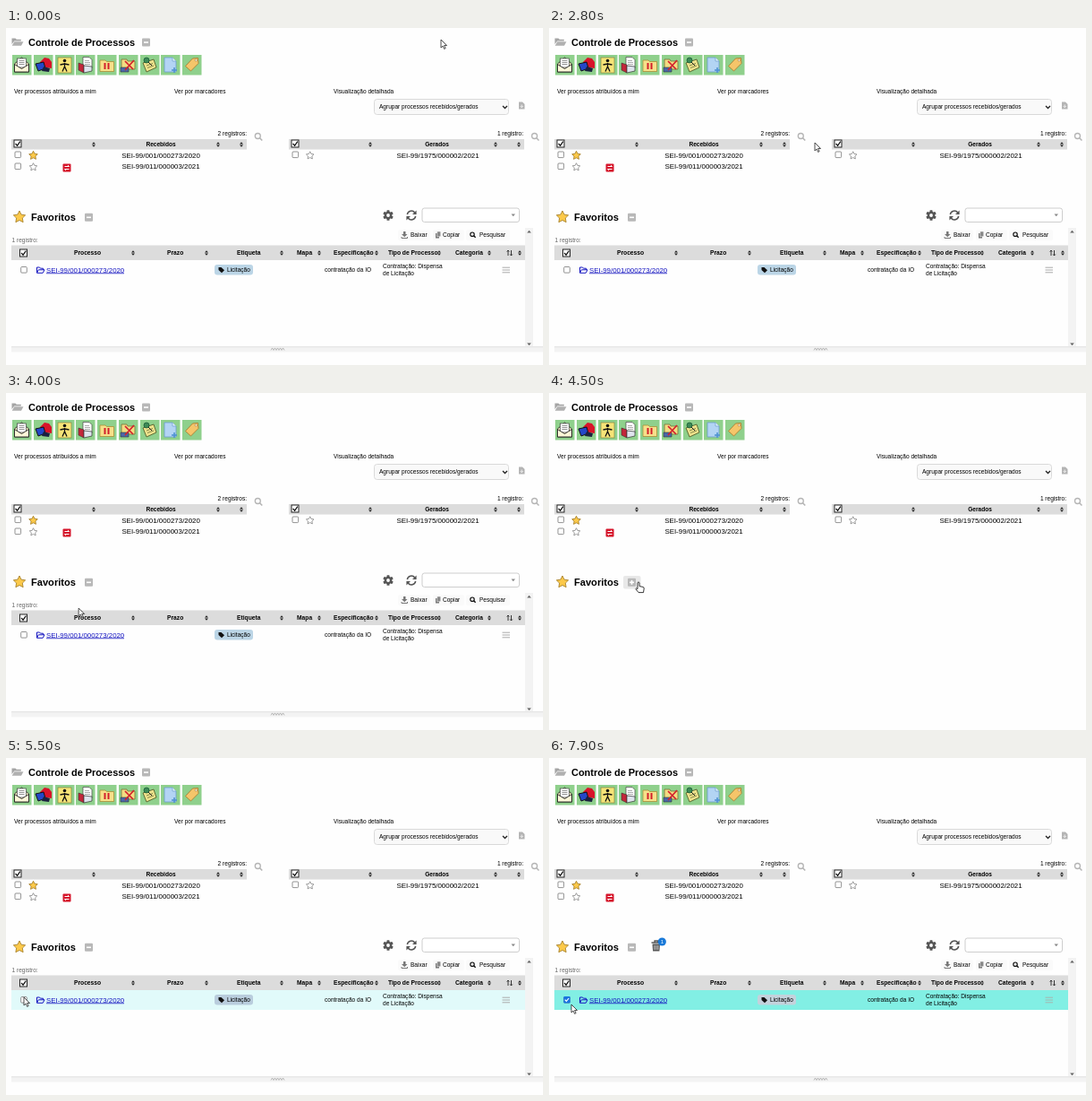
Recreate the animation shown at these times as an HTML page. Size 600x376 px, loop 8 s.

```html
<!DOCTYPE html>
<html lang="pt-BR">
<head>
<meta charset="utf-8">
<title>Controle de Processos</title>
<style>
html, body { margin: 0; width: 100%; height: 100%; overflow: hidden; background: #fefefe; }
svg { display: block; font: 6.55px "Liberation Sans", Arial, sans-serif; }
.b { font-weight: bold; }
</style>
</head>
<body>
<svg id="stage" width="600" height="376" viewBox="0 0 600 376"></svg>
<script>
const rect = (x, y, w, h, fill, more = '') =>
  `<rect x="${x}" y="${y}" width="${w}" height="${h}" fill="${fill}" ${more}/>`;
const path = (d, fill, stroke = 'none', width = 1, more = '') =>
  `<path d="${d}" fill="${fill}" stroke="${stroke}" stroke-width="${width}" ${more}/>`;
const line = (d, stroke, width = 1) => path(d, 'none', stroke, width);
const circle = (x, y, r, fill, more = '') => `<circle cx="${x}" cy="${y}" r="${r}" fill="${fill}" ${more}/>`;
const text = (x, y, s, more = '') => `<text x="${x}" y="${y}" ${more}>${s}</text>`;
const bold = (x, y, s, more = '') => text(x, y, s, 'class="b" ' + more);
const at = (x, y, s) => `<g transform="translate(${x} ${y})">${s}</g>`;
const group = (id, s) => `<g id="${id}">${s}</g>`;
const MIDDLE = 'text-anchor="middle"', END = 'text-anchor="end"';

function star(x, y, r, fill, stroke, width) {
  let d = '';
  for (let i = 0; i < 10; i++) {
    const a = (i / 5 - .5) * Math.PI, q = i % 2 ? r * .5 : r;
    d += (i ? 'L' : 'M') + (x + q * Math.cos(a)).toFixed(2) + ' ' + (y + q * Math.sin(a)).toFixed(2);
  }
  return path(d + 'Z', fill, stroke, width, 'stroke-linejoin="round"');
}
const goldStar = (x, y, r) => star(x, y, r, '#fcc94a', '#a8802a', .9);
const sort = (x, y) => path(`M${x - 2} ${y - .5}l2 -2.3 2 2.3zM${x - 2} ${y + .5}l2 2.3 2 -2.3z`, '#222');
const box = (x, y) => rect(x, y, 6.6, 6.6, '#fff', 'rx="1" stroke="#777" stroke-width=".8"');
const checkAll = (x, y) => rect(x, y, 8, 8, '#fff', 'stroke="#222"') +
  line(`M${x + 1.6} ${y + 4}l2 2.2 3.2 -4.6`, '#111', 1.2);
const toggle = (x, y) => rect(x, y, 9, 9, '#b8b8b8', 'rx="1"') + rect(x + 2, y + 3.7, 5, 1.6, '#fff');
const lens = (x, y, c, r = 3, w = 1.3) => circle(x, y, r, 'none', `stroke="${c}" stroke-width="${w}"`) +
  line(`M${x + r * .75} ${y + r * .75}l${r * .9} ${r * .9}`, c, w * 1.2);

// Toolbar pictures, each on a 21 x 22 tile
const pictures = [
  path('M2.5 10l8 -7 8 7v9h-16z', '#f3ecc0', '#222', .9) + rect(5.5, 4, 10, 10, '#fff', 'stroke="#444" stroke-width=".7"') +
    line('M7.5 6.5h6M7.5 8.5h6M7.5 10.5h6', '#666', .7) + path('M2.5 10.5l8 5 8 -5v8.5h-16z', '#fff8d8', '#222', .9),
  path('M7 8l5 -5 5 1 3 4v7l-6 -1 -6 -2z', '#d8142a') + path('M2 10l9 -2 2 7 -8 3z', '#2447c8', '#111', 1) +
    path('M11 13l7 2 -1 4 -8 -1z', '#1b2140'),
  rect(3, 3, 15, 17, '#f6e478', 'stroke="#8a8440" stroke-width=".7"') + circle(10.5, 6.5, 1.8, '#111') +
    line('M5.5 11l5 -1 5 1M10.500 9v5M10.500 13l-2.500 5.500M10.500 13l2.500 5.500', '#111', 1.3),
  path('M8 2.5h7l3 3v9h-10z', '#fff', '#444', .7) + line('M10 6.5h5M10 8.500h6M10 10.500h6', '#888', .7) +
    path('M3 9l6 2v9l-6 -3z', '#c3263a', '#333', .6) + path('M9 12l9 1v5l-9 2z', '#dfe4ee', '#333', .7),
  path('M3 6h6l1.500 1.500h8v11h-15.500z', '#f6e08a', '#a8842c', .7) + rect(7.5, 9, 2, 7, '#d21f2b') + rect(11.5, 9, 2, 7, '#d21f2b'),
  path('M3 5h6l1 2h8v9h-15z', '#f3dc82', '#6f612b', .7) + path('M2 14h9v5h-9z', '#4a68a8', '#333', .6) +
    line('M7 7l9 9M17 6l-10 11', '#d3202c', 1.7),
  path('M3 9l12 -4 3 9 -11 5z', '#eee28c', '#55602c', .9) + line('M7 12l7 -2.500M8 14.500l7 -2.500', '#6b7038', .8) +
    circle(7, 6, 3, '#3f8a56', 'stroke="#153" stroke-width=".7"') + line('M9 8l4 4', '#222', 1),
  path('M4 3h9l4 4v12h-13z', '#b3d4f4', '#6a9ccc', .8) + path('M13 3v4h4', '#e3f1fc', '#6a9ccc', .7) +
    line('M15 14v6M12 17h6', '#4b8fd0', 1.5),
  path('M3.500 12.500l8 -8.500 6 -.500 .500 6 -8.500 8.500z', '#f5c56a', '#a8742a', .8, 'stroke-linejoin="round"') +
    circle(15.3, 6, 1.2, '#fff', 'stroke="#a8742a" stroke-width=".6"')
];
const toolbar = pictures.map((p, i) =>
  at(7 + Math.round(i * 23.75), 30, rect(0, 0, 21.5, 22.5, '#8fd08c') + p)).join('');

const heading = path('M6.5 18v-6.5h4l1.3 1.3h5v1.7h-7.5z', '#a5a5a5') + path('M9.3 15.3h10.2l-2.5 4.5h-10.3z', '#b0b0b0') +
  bold(25, 19.7, 'Controle de Processos', 'font-size="10.95"') + toggle(152, 11.5) + toolbar +
  text(9, 73.3, 'Ver processos atribuídos a mim') + text(188, 73.3, 'Ver por marcadores') +
  text(366, 73.3, 'Visualização detalhada') +
  rect(411.5, 79.5, 150, 17, '#f9f9f9', 'rx="3" stroke="#d6d6d6" stroke-width=".9"') +
  text(417, 90.3, 'Agrupar processos recebidos/gerados') + line('M555 87l2.5 2.5 2.5 -2.5', '#222', 1.3) +
  path('M573 82.5h4l2.5 2.5v5.5h-6.5z', '#b4b4b4') + line('M576.2 85.5v3M574.7 87.2l1.5 1.5 1.5 -1.5', '#fff', .8);

const number = (x, y, s) => text(x, y, s, MIDDLE + ' font-size="7.9"');
const inbox = text(269, 120, '2 registros:', END) + lens(281.3, 120.5, '#b4b4b4') +
  rect(6, 124, 263, 11.5, '#dcdcdc') + checkAll(9, 125) + bold(173, 132.3, 'Recebidos', MIDDLE) +
  [98, 237, 263].map(x => sort(x, 130)).join('') + box(10, 138) + box(10, 151) +
  goldStar(30.5, 142.3, 5) + star(30.5, 155.2, 4.5, '#fff', '#858585', .8) +
  rect(63.5, 151.5, 9, 9, '#d5152b', 'rx="1"') +
  line('M65.5 154.500h5l-1.500 -1.300M70.500 157.500h-5l1.500 1.300', '#fff', 1) +
  number(173, 144.5, 'SEI-99/001/000273/2020') + number(173, 157.2, 'SEI-99/011/000003/2021');

const created = text(578, 120, '1 registro:', END) + lens(590.5, 120.5, '#b4b4b4') +
  rect(316, 124, 263, 11.5, '#dcdcdc') + checkAll(319, 125) + bold(481.5, 132.3, 'Gerados', MIDDLE) +
  [407, 547, 573].map(x => sort(x, 130)).join('') + box(320, 138) +
  star(339.7, 142.3, 4.5, '#fff', '#858585', .8) + number(482.5, 144.5, 'SEI-99/1975/000002/2021');

const spokes = [0, 60, 120].map(a =>
  rect(-1.5, -5.8, 3, 11.6, '#555', `rx=".6" transform="rotate(${a})"`)).join('');
const gear = at(427, 209, spokes + circle(0, 0, 4.3, '#555') + circle(0, 0, 1.9, '#fefefe'));
const refresh = at(453, 209, line('M-4.7 -1a4.8 4.8 0 0 1 8.5 -2M4.7 1a4.8 4.8 0 0 1 -8.5 2', '#555', 1.5) +
  path('M5.6 -5.6v4.600h-4.600zM-5.600 5.600v-4.600h4.600z', '#555'));

const buttons = [[438, 36], [477, 35], [514, 49]].map(([x, w]) => rect(x, 225, w, 12, '#fafafa', 'rx="2"')).join('') +
  path('M444 227h2.5v3h2l-3.25 3.2 -3.25 -3.2h2z', '#777') + line('M442 233v1.5h6.5v-1.5', '#777', 1) +
  text(452, 233.3, 'Baixar') + rect(480, 229, 4, 5.5, '#777') + rect(481.8, 227, 4, 5.8, '#888', 'stroke="#fff" stroke-width=".5"') +
  text(488, 233.3, 'Copiar') + lens(521, 230.2, '#111', 2.2, 1.2) + text(529, 233.3, 'Pesquisar');

const columns = [['Processo', 76, 142], ['Prazo', 180, 224], ['Etiqueta', 258, 308], ['Mapa', 325, 350],
  ['Especificação', 366, 414], ['Tipo de Processo', 427, 484], ['Categoria', 502, 540]];
const head = rect(6, 242.5, 574, 16.5, '#dcdcdc') + checkAll(15.5, 247) +
  columns.map(([s, x, arrow]) => bold(x, 253.3, s, 'font-size="6.7"') + sort(arrow, 251)).join('') +
  line('M561 248v6M564.5 254v-6M559.7 249.5l1.3 -1.5 1.3 1.5M563.2 252.5l1.3 1.5 1.3 -1.5', '#222', .9) +
  sort(574, 251);

const row = `<rect id="rowFill" x="6" y="259" width="574" height="22"/>` + box(16.7, 266.5) +
  group('ticked', rect(16.3, 266, 7.4, 7.4, '#1874e0', 'rx="1.2"') + line('M17.8 269.7l1.6 1.7 2.8 -3.4', '#fff', 1.1)) +
  path('M34.5 273v-6h3l1 1.2h3v1.6M34.5 273.3l1.8 -3.5h6.7l-1.8 3.5z', 'none', '#1515c0', 1) +
  text(45, 272.5, 'SEI-99/001/000273/2020', 'font-size="7.85" fill="#1515c0"') + rect(45, 273.4, 87, .8, '#1515c0') +
  group('external', line('M139 267.5h-3v6h5.5v-3M138.5 270.5l3.5 -3.5M139.7 266.8h2.5v2.5', '#555', .9)) +
  `<rect id="pill" x="233" y="264" width="43" height="11.5" rx="3"/>` +
  path('M237.5 267h3l3.5 3.3 -3 3 -3.5 -3.3z', '#111') + text(247, 272.3, 'Licitação') +
  text(356, 272.3, 'contratação da IO') + text(421, 268.4, 'Contratação: Dispensa') + text(421, 276, 'de Licitação') +
  `<path id="menu" d="M554.5 267.2h8.5M554.5 270h8.5M554.5 272.8h8.5"/>`;

const panel = gear + refresh +
  rect(465, 201, 108.5, 15.5, '#fff', 'rx="2.5" stroke="#c8c8c8" stroke-width=".9"') + path('M564.5 207.5h4.5l-2.25 2.8z', '#888') +
  buttons + text(6.5, 239, '1 registro:', 'fill="#666"') + rect(580, 223, 9, 132.5, '#f3f3f3') +
  path('M582.2 228.5h4.6l-2.3 -2.8z', '#666') + path('M582.2 351.5h4.6l-2.3 2.8z', '#666') + head + row +
  rect(6, 355.5, 594, 6, '#f3f3f3') + line('M6 355.8h594', '#dcdcdc', .8) +
  line('M296 359.5' + 'l1.5 -2.5 1.5 2.5'.repeat(5), '#aaa', .8);

const trash = line('M114.5 206h10.5M118 205.5v-1.5h3.5v1.5', '#555', 1.3) +
  path('M115.5 207.5h8.5l-.6 8h-7.3z', '#555') + line('M117.8 209v5M119.8 209v5M121.8 209v5', '#fefefe', .7) +
  circle(126.3, 205, 4.6, '#1879d8') + text(126.3, 207.2, '1', MIDDLE + ' fill="#fff" font-size="6"');

const favourites = goldStar(15, 211, 7) + bold(28, 214.8, 'Favoritos', 'font-size="11.1"') +
  group('toggleHover', rect(83, 204, 19.5, 14.5, '#e8e8e8', 'rx="2"')) + toggle(88, 206.8) +
  group('plus', rect(91.7, 208.8, 1.6, 5, '#fff'));

document.getElementById('stage').innerHTML = heading + inbox + created + favourites + group('trash', trash) +
  group('panel', panel) +
  group('arrow', path('M0 0v9l2.1 -1.9 1.5 3.3 1.5 -.7 -1.5 -3.2h2.9z', '#fff', '#222', .8)) +
  group('hand', path('M-1 1q1 -1.5 2 0v4l4 .8q1.3 .4 1.2 1.7l-.7 4.5h-5.5l-3.2 -4q.6 -1.5 2.2 0z', '#fff', '#222', .9));

// Pointer stops: time, x, y
const stops = [[0, 486, 13], [2280, 486, 13], [2420, 465, 24], [2800, 297, 128], [3300, 110, 238], [3600, 66, 260],
  [3850, 67, 262], [4200, 100, 210.6], [5020, 100, 210.6], [5450, 20, 267], [5950, 20, 267], [6400, 25, 275],
  [7100, 25, 275], [7500, 29, 286], [7900, 25, 275], [8000, 25, 275]];

function pointer(t) {
  const i = stops.findIndex(s => s[0] > t);
  const [t0, x0, y0] = stops[i - 1], [t1, x1, y1] = stops[i];
  const k = (t - t0) / (t1 - t0);
  return [x0 + (x1 - x0) * k, y0 + (y1 - y0) * k];
}

const el = id => document.getElementById(id);
const show = (id, on) => el(id).setAttribute('visibility', on ? 'visible' : 'hidden');
const paint = (id, fill) => el(id).setAttribute('fill', fill);

function draw() {
  const t = Math.floor(performance.now() % 8000 / 100) * 100;
  const [x, y] = pointer(t);
  const open = t < 4300 || t >= 5000, selected = t >= 5900;
  const overRow = open && y >= 259 && y < 281;
  const overToggle = x > 83 && x < 103 && y > 204 && y < 219;
  const overLink = overRow && x > 34 && x < 132 && y > 265 && y < 275;

  el('panel').setAttribute('display', open ? 'inline' : 'none');
  show('plus', !open);
  show('toggleHover', overToggle);
  show('trash', selected);
  show('ticked', selected);
  show('external', overRow && x > 29 && x < 160);
  paint('rowFill', selected ? '#82efe4' : overRow ? '#e1fafa' : '#fefefe');
  paint('pill', selected ? '#c4d2dc' : overRow ? '#b9cddd' : '#bbd5e6');
  el('menu').setAttribute('stroke', selected ? '#a5b5ae' : '#aaa');

  const hand = overToggle || overLink;
  show('hand', hand);
  show('arrow', !hand);
  el(hand ? 'hand' : 'arrow').setAttribute('transform', `translate(${x} ${y})`);
  requestAnimationFrame(draw);
}
draw();
</script>
</body>
</html>
```
